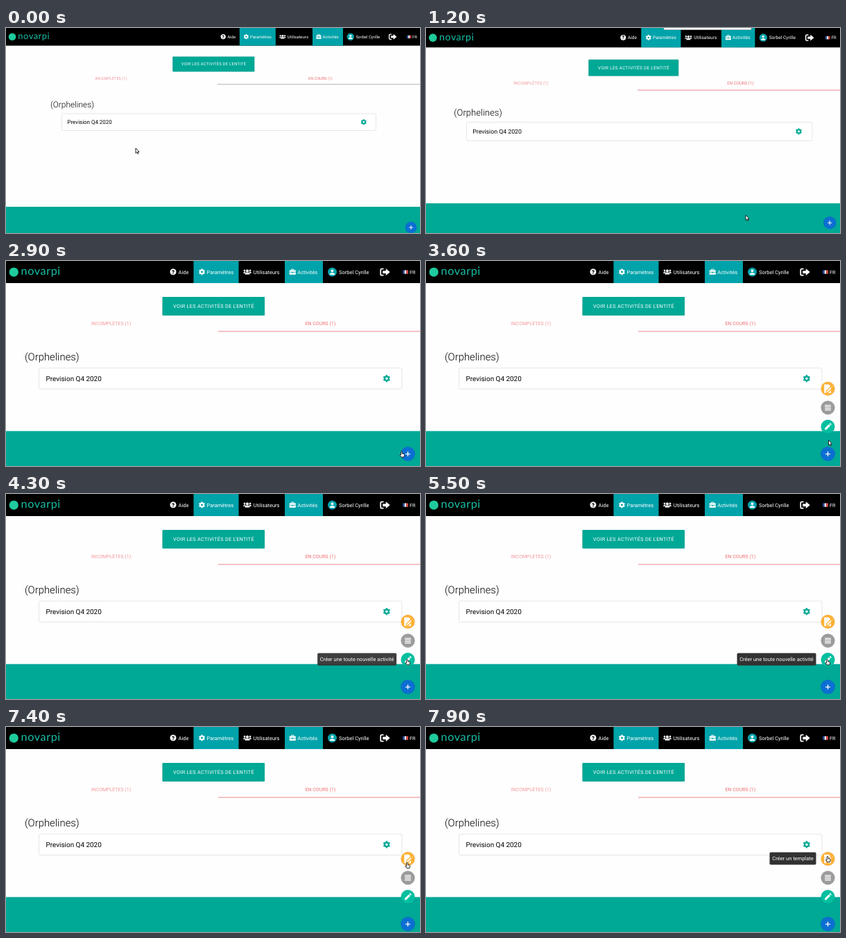
These frames come from a looping animation (597 px wide and 297 px high, 8500 ms). An HTML page:

```html
<!DOCTYPE html>
<html lang="fr">
<head>
<meta charset="utf-8">
<title>Activités</title>
<style>
  html, body { margin: 0; width: 100%; height: 100%; overflow: hidden; background: #fefefe; }
  svg { display: block; width: 597px; height: 297px; font-family: Roboto, sans-serif; text-rendering: geometricPrecision; }
  #nav { font-size: 6px; fill: #fff; }
  .line { fill: none; stroke: #fff; }
  .active { fill: #00a3aa; }
  .teal { fill: #00a896; }
  .mid { text-anchor: middle; }
  .tab { font-size: 5.6px; fill: #ee6e73; text-anchor: middle; }
  .raised { filter: drop-shadow(0 .6px .6px #0004); }
  .tip rect { fill: #323232; }
  .tip text { fill: #fff; font-size: 6px; text-anchor: middle; }
</style>
</head>
<body>
<svg viewBox="0 0 597 297">
  <defs>
    <g id="cog" fill="none" stroke="currentColor">
      <circle r="2.2" stroke-width="1.8"/>
      <circle r="3.2" stroke-width="1.5" pathLength="12" stroke-dasharray="1" stroke-dashoffset=".5" transform="rotate(90)"/>
    </g>
    <g id="pen">
      <path d="M-3.6 3.6V1.8L1.1-2.9 2.9-1.1-1.8 3.6ZM1.7-3.5 2.3-4Q2.7-4.3 3.1-4L4-3.1Q4.3-2.7 4-2.3L3.5-1.7Z"/>
    </g>
  </defs>

  <rect id="foot" class="teal" width="597" height="60"/>

  <g id="bar">
    <rect width="620" height="25.6"/>
    <circle cx="9" cy="12.8" r="5.3" fill="#1fcb9c"/>
    <text x="17.3" y="16.4" font-size="13" letter-spacing=".45" fill="#17bfa6" style="font-family:Lato,sans-serif">novarpi</text>
  </g>

  <g id="nav">
    <rect class="active" x="-265.2" width="52" height="25.6"/>
    <rect class="active" x="-160" width="44" height="25.6"/>
    <circle cx="-288.8" cy="12.6" r="3.6"/>
    <text class="mid" x="-288.8" y="14.9" font-size="6.4" font-weight="900" fill="#000">?</text>
    <text x="-282.8" y="14.9">Aide</text>
    <use href="#cog" color="#fff" transform="translate(-255.6 12.6) scale(.92)"/>
    <text x="-250" y="14.9">Paramètres</text>
    <g transform="translate(-203.2 12.6)">
      <circle cx="-3.2" cy="-1.6" r="1.1"/><circle cx="3.2" cy="-1.6" r="1.1"/><circle cy="-1.3" r="1.6"/>
      <path d="M-4.7 1.6Q-4.7-.2-3-.2H-2L-2.7 1.6ZM4.7 1.6Q4.7-.2 3-.2H2L2.7 1.6ZM-2.8 3Q-2.8.6-1 .6H1Q2.8.6 2.8 3Z"/>
    </g>
    <text x="-196.2" y="14.9">Utilisateurs</text>
    <g transform="translate(-151 12.6)">
      <path d="M-3.7 0V-1.5Q-3.7-2-3.2-2H3.2Q3.7-2 3.7-1.5V0ZM-3.7.6H-.8V1.3H.8V.6H3.7V2.6Q3.7 3.1 3.2 3.1H-3.2Q-3.7 3.1-3.7 2.6Z"/>
      <path class="line" d="M-1.4-2V-3H1.4V-2" stroke-width=".8"/>
    </g>
    <text x="-145.4" y="14.9">Activités</text>
    <circle cx="-105.2" cy="12.8" r="5.2" fill="#00a3aa"/>
    <circle cx="-105.2" cy="11.3" r="1.6"/>
    <path d="M-108.2 15.9Q-108 13.6-105.2 13.6T-102.2 15.9Z"/>
    <text x="-97.6" y="14.9">Sorbel Cyrille</text>
    <g transform="translate(-44.4 12.8)">
      <path class="line" d="M-1.6-3.7H-3.6Q-5-3.7-5-2.3V2.3Q-5 3.7-3.6 3.7H-1.6" stroke-width="1.4"/>
      <path d="M-2.6-1.5H1V-4L5.8 0 1 4V1.5H-2.6Z"/>
    </g>
    <path d="M-23.9 10.7h2.1v4.2h-2.1z" fill="#2b4fa0"/>
    <path d="M-21.8 10.7h2.1v4.2h-2.1z"/>
    <path d="M-19.7 10.7h2.1v4.2h-2.1z" fill="#e0453f"/>
    <text x="-16" y="14.9" font-size="5.7">FR</text>
  </g>

  <g id="button">
    <rect class="teal raised" x="-59" y="41.6" width="118" height="21.6" rx=".8"/>
    <text class="mid" x=".2" y="54.2" font-size="5.85" letter-spacing=".24" fill="#fff">VOIR LES ACTIVITÉS DE L'ENTITÉ</text>
  </g>
  <g id="tabA"><text class="tab" y="74.5" opacity=".7">INCOMPLÈTES (1)</text></g>
  <g id="tabB"><text class="tab" y="74.5">EN COURS (1)</text></g>
  <rect id="under" width="300" height="1"/>

  <g id="card">
    <rect id="box" y="124" height="24.4" rx="1.6" fill="#fff" stroke="#e6e6e6" vector-effect="non-scaling-stroke"/>
    <text x="-16.5" y="115.4" font-size="11.9" font-weight="300">(Orphelines)</text>
    <text x="8" y="138.9" font-size="7.95">Prevision Q4 2020</text>
  </g>
  <g id="gear"><use href="#cog" color="#00a896" transform="translate(-17.7 136.2) scale(1.05)"/></g>

  <g id="fab">
    <g class="item">
      <circle class="raised" r="8" fill="#00bfa0"/>
      <use href="#pen" fill="#fff"/>
    </g>
    <g class="item">
      <circle class="raised" r="8" fill="#9c9c9c"/>
      <path class="line" d="M-3.5-2.7h7M-3.5-.9h7M-3.5.9h7M-3.5 2.7h7" stroke-width=".9"/>
    </g>
    <g class="item">
      <circle class="raised" r="8" fill="#ffb136"/>
      <path d="M-4.2-5H1L3.6-2.4V5H-4.2Z" fill="#fff"/>
      <use href="#pen" transform="translate(2 .6)" fill="#fff" stroke="#ffb136" stroke-width="1"/>
    </g>
    <circle class="raised" cx="-18" cy="-18" r="8.2" fill="#0b6fd3"/>
    <path class="line" d="M-20.8-18h5.6M-18-20.8v5.6" stroke-width="1"/>
    <g class="tip"><rect x="-91.2" y="-7.6" width="91.2" height="14.4" rx="1.4"/><text x="-45.6" y="1.7">Créer une toute nouvelle activité</text></g>
    <g class="tip"><rect x="-95.2" y="-7.6" width="95.2" height="14.4" rx="1.4"/><text x="-47.6" y="1.7">Créer depuis un template existant</text></g>
    <g class="tip"><rect x="-53.6" y="-7.6" width="53.6" height="14.4" rx="1.4"/><text x="-26.8" y="1.7">Créer un template</text></g>
  </g>

  <rect id="popup" x="343" y="-6" width="126" height="8.5" rx="1" fill="#fff" stroke="#aaa" stroke-width=".7"/>
  <g id="mouse" fill="#fff" stroke="#111" stroke-width=".9" stroke-linejoin="round">
    <path id="arrow" d="M0 0V7.4L1.7 5.9 2.9 8.4 4 7.9 2.9 5.4H5Z"/>
    <path id="hand" d="M-.9 4V.4Q-.9-.5 0-.5T.9.4V2.6L3.5 3.1Q4.3 3.3 4.1 4.8L3.4 7.6H-.5L-2.7 4.7Q-2.4 3.5-.9 4.8Z"/>
  </g>
</svg>
<script>
const $ = id => document.getElementById(id);
const all = c => [...document.querySelectorAll(c)];
const items = all('.item'), tips = all('.tip');
const LOOP = 8500, RIGHT = 602;
const itemY = [-49.6, -71.6, -93.6];

// Page states: zoom level, card edges, footer top, bottom edge, tab underline
const pages = [
  { from: 0, z: 1, l: 80.5, r: 533.5, foot: 259, bottom: 307, tab: 304.5, line: 81, ink: '#b9b9bd' },
  { from: 400, z: 1.1, l: 58.5, r: 557, foot: 254, bottom: 302, tab: 305, line: 89.5, ink: '#f0888c' },
  { from: 1400, z: 1.25, l: 47.5, r: 571, foot: 246.4, bottom: 302, tab: 306, line: 101.5, ink: '#f0888c' },
  { from: 7300, z: 1.25, l: 47.5, r: 571, foot: 246.4, bottom: 308, tab: 306, line: 101.5, ink: '#f0888c' }
];
// Pointer path: time, x, y
const path = [
  [0, 187, 174], [100, 187, 174], [600, 440, 262], [1000, 440, 262], [1200, 461, 271],
  [1500, 523, 287], [1700, 523, 287], [2200, 556, 281], [2300, 562, 276], [2500, 562, 276],
  [3300, 579, 277], [3400, 579, 274], [3600, 580.5, 259.5], [4200, 578.5, 240],
  [5500, 578.5, 240], [6300, 577.5, 212], [6900, 577.5, 212], [7700, 579, 188], [LOOP, 579, 188]
];
// Tooltip times: show start, show end, hide start, hide end
const tipTimes = [[4000, 4500, 5500, 5800], [6000, 6300, 6900, 7200], [7600, 7900, 9000, 9300]];

const ramp = (t, a, b) => Math.min(1, Math.max(0, (t - a) / (b - a)));
const ease = u => 1 - (1 - u) ** 3;
const place = (id, x, y, z) => $(id).setAttribute('transform', `translate(${x} ${y}) scale(${z})`);
const set = (id, attrs) => { for (const k in attrs) $(id).setAttribute(k, attrs[k]); };

function pointer(t) {
  const i = path.findIndex(p => p[0] > t), [t0, x0, y0] = path[i - 1], [t1, x1, y1] = path[i];
  const u = ramp(t, t0, t1);
  return [x0 + (x1 - x0) * u, y0 + (y1 - y0) * u];
}

function draw(t) {
  const p = pages.findLast(s => s.from <= t), z = p.z;
  place('bar', 0, 0, z);
  place('nav', RIGHT, 0, z);
  place('button', 299.3, 0, z);
  place('tabA', 151.4, 0, z);
  place('tabB', 453.4, 0, z);
  place('card', p.l, 0, z);
  place('gear', p.r, 0, z);
  place('fab', RIGHT, p.bottom, z);
  set('box', { width: (p.r - p.l) / z });
  set('foot', { y: p.foot });
  set('under', { x: p.tab, y: p.line, fill: p.ink });
  set('popup', { opacity: t >= 400 && t < 2900 ? 1 : 0 });

  items.forEach((el, i) => {
    const u = ease(ramp(t, 2900 + 40 * i, 3250 + 40 * i));
    el.setAttribute('transform', `translate(-18 ${itemY[i]}) scale(${.4 + .6 * u})`);
    el.setAttribute('opacity', u);
  });
  tips.forEach((el, i) => {
    const [a, b, c, d] = tipTimes[i];
    const u = ease(ramp(t, a, b)) * (1 - ramp(t, c, d));
    el.setAttribute('transform', `translate(${-31.6 + 8 * (1 - u)} ${itemY[i]})`);
    el.setAttribute('opacity', u);
  });

  const [x, y] = pointer(t);
  const over = [-18, ...itemY].some(c => Math.hypot(x - RIGHT + 18 * z, y - p.bottom - c * z) < 8 * z);
  place('mouse', x, y, 1);
  set('arrow', { opacity: over ? 0 : 1 });
  set('hand', { opacity: over ? 1 : 0 });
}

function tick(now) {
  draw(Math.floor(now % LOOP / 100) * 100);
  requestAnimationFrame(tick);
}
draw(0);
requestAnimationFrame(tick);
</script>
</body>
</html>
```
